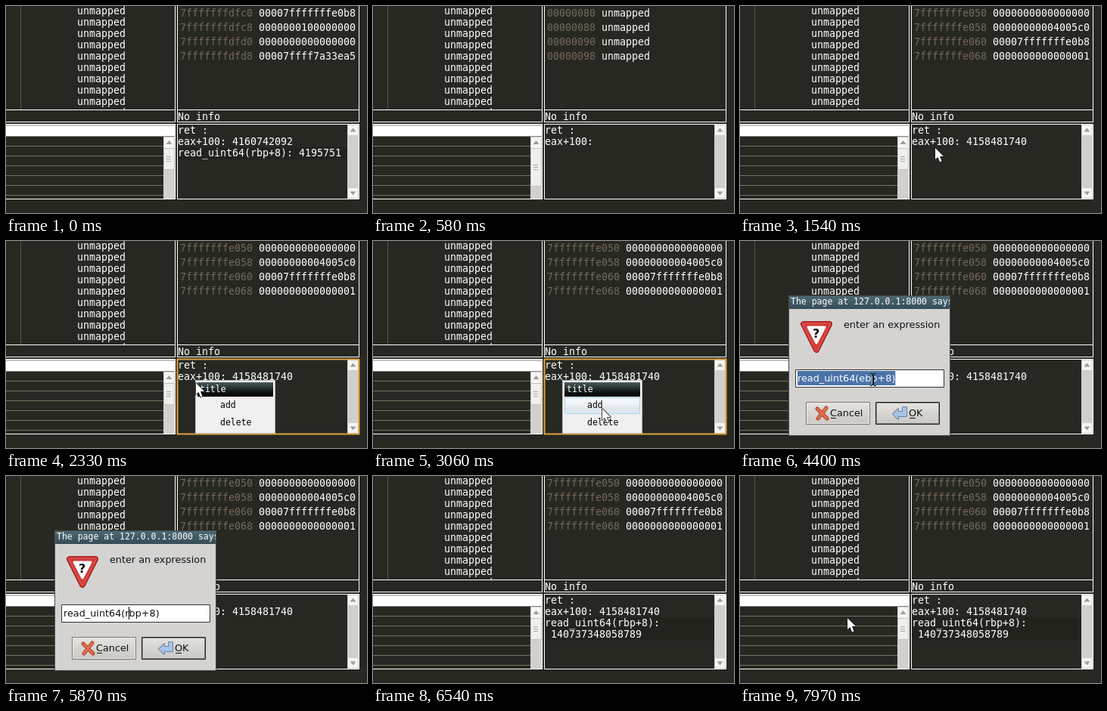
Write an HTML page with a canvas that moves like this. It is 477 px wide and 274 px high and loops after 8 s.

```html
<!DOCTYPE html>
<html lang="en">
<head>
<meta charset="utf-8">
<title>Debugger expressions</title>
<style>
  html, body { margin: 0; width: 100%; height: 100%; overflow: hidden; background: #272822; }
  canvas { display: block; }
</style>
</head>
<body>
<canvas id="stage" width="477" height="274"></canvas>
<script>
const ctx = document.getElementById('stage').getContext('2d');
const LOOP = 8000;
const BG = '#272822', WHITE = '#fff', DIM = '#75685a';
const MONO = '13.29px "DejaVu Sans Mono", monospace';
const SMALL = '11.5px "DejaVu Sans Mono", monospace';
const SANS = '12.8px "DejaVu Sans", sans-serif';

// Pointer stops: time, x, y. The pointer eases between neighbours.
const PATHS = [
  [[1320, 330, 234], [1540, 258, 188], [1800, 249, 185], [2290, 249, 185], [2500, 273, 211],
   [2760, 297, 232], [3060, 303, 222], [3140, 302, 217], [3660, 302, 217], [4000, 245, 200],
   [4400, 176, 183], [4480, 176, 183], [4720, 168, 181], [4870, 168, 181], [5200, 143, 191], [5660, 143, 191]],
  [[6900, 142, 188], [8000, 142, 188]]
];

function box(x, y, w, h, fill) {
  ctx.fillStyle = fill;
  ctx.fillRect(x, y, w, h);
}
function frame(x, y, w, h, color, width = 1) {
  ctx.strokeStyle = color;
  ctx.lineWidth = width;
  ctx.strokeRect(x + .5, y + .5, w - 1, h - 1);
}
function text(str, x, y, color = WHITE, font = MONO) {
  ctx.font = font;
  ctx.fillStyle = color;
  ctx.fillText(str, x, y);
}
function shape(points, fill, stroke, width = 1) {
  ctx.beginPath();
  points.forEach(([x, y]) => ctx.lineTo(x, y));
  ctx.closePath();
  ctx.lineJoin = 'round';
  ctx.lineWidth = width;
  if (stroke) { ctx.strokeStyle = stroke; ctx.stroke(); }
  if (fill) { ctx.fillStyle = fill; ctx.fill(); }
}
function shade(y, h, ...colors) {
  const g = ctx.createLinearGradient(0, y, 0, y + h);
  colors.forEach((c, i) => g.addColorStop(i / (colors.length - 1), c));
  return g;
}
function measure(str, font) {
  ctx.font = font;
  return ctx.measureText(str).width;
}

function pointerAt(t) {
  const path = PATHS.find(p => t >= p[0][0] && t < p[p.length - 1][0]);
  if (!path) return null;
  const i = path.findIndex(p => p[0] > t);
  const [t0, x0, y0] = path[i - 1], [t1, x1, y1] = path[i];
  const k = (t - t0) / (t1 - t0), e = k * k * (3 - 2 * k);
  return [Math.round(x0 + (x1 - x0) * e), Math.round(y0 + (y1 - y0) * e)];
}

function scrollButton(x, y, w, h, dir) {
  box(x, y, w, h, '#f6f5f4');
  frame(x, y, w, h, '#d0ccc9');
  const cx = x + w / 2, cy = y + h / 2;
  shape([[cx - 4, cy + 2 * dir], [cx + 4, cy + 2 * dir], [cx, cy - 3 * dir]], '#a09c98');
}

function drawCode() {
  ctx.save();
  ctx.beginPath();
  ctx.rect(0, 0, 223, 137);
  ctx.clip();
  box(19, 0, 1, 137, '#55554a');
  for (let i = 0; i < 10; i++) text('unmapped', 94, 11 + 15 * i);
  ctx.restore();
  box(0, 137, 224, 1, WHITE);
  box(0, 153, 224, 1, WHITE);
  box(223, 0, 1, 154, WHITE);
}

function drawTable(thumbEnd) {
  box(0, 156, 224, 1, WHITE);
  box(0, 157, 223, 2, '#c8c5c0');
  box(0, 159, 223, 13, WHITE);
  box(0, 172, 223, 1, '#8a8880');
  for (let y = 185; y < 255; y += 13) box(0, y, 208, 1, '#75715e');
  box(208, 173, 15, 82, '#d3cfcc');
  scrollButton(208, 173, 15, 16, 1);
  box(209, 189, 13, thumbEnd - 189, '#f0efed');
  frame(208, 188, 15, thumbEnd - 188, '#c4c0bc');
  const grip = Math.round((189 + thumbEnd) / 2);
  for (let i = -1; i < 2; i++) box(212, grip + 3 * i - 1, 6, 1, '#aaa6a2');
  box(223, 156, 1, 100, WHITE);
  box(0, 255, 224, 1, WHITE);
}

function drawStack(rows) {
  rows.forEach(([address, value], i) => {
    text(address, 230, 14 + 19 * i, DIM);
    text(value, 238 + 8 * address.length, 14 + 19 * i);
  });
  box(226, 0, 1, 154, WHITE);
  box(466, 0, 1, 154, WHITE);
  box(226, 137, 241, 1, WHITE);
  box(226, 153, 241, 1, WHITE);
  text('No info', 227, 151);
}

function drawExpressions(lines, focused) {
  if (lines.length > 2) box(227, 187, 224, 15 * (lines.length - 2) + 1, '#22231c');
  lines.forEach((line, i) => text(line, 227, 169 + 15 * i));
  box(451, 157, 15, 98, '#d3cfcc');
  scrollButton(451, 157, 15, 15, 1);
  scrollButton(451, 240, 15, 15, -1);
  frame(226, 156, 241, 100, focused ? '#e0a23c' : WHITE, focused ? 2 : 1);
}

function drawMenu(pointer) {
  box(250, 184, 106, 71, '#f0f0f0');
  frame(250, 184, 106, 71, '#b8b8b8');
  box(253, 187, 100, 19, shade(187, 19, '#4d5c5c', '#2c3939', '#101616', '#000'));
  text('title', 256, 200, WHITE, SMALL);
  ['add', 'delete'].forEach((item, i) => {
    const top = 207 + 23 * i;
    if (pointer && pointer[1] >= top && pointer[1] < top + 23) {
      box(253, top, 100, 22, shade(top, 22, '#f5f9fc', '#f0f5f9', '#e0e6ed', '#dfe6ee'));
      frame(253, top, 100, 22, '#a9d9ec');
    }
    text(item, 283, 221 + 23 * i, '#000', SMALL);
  });
}

function drawButton(x, label, labelX, strong) {
  box(x, 213, 85, 31, shade(213, 31, '#e6e5e3', '#d6d4d1', '#c9c7c4'));
  frame(x, 213, 85, 30, strong ? '#1c1c1c' : '#777572');
  frame(x + 1, 214, 83, 28, strong ? '#8a8886' : '#efeeec');
  text(label, labelX, 232, '#111', SANS);
  box(labelX + 1, 234, measure(label[0], SANS) - 2, 1, '#111');
}

function drawDialog(t) {
  box(64, 72, 214, 186, '#d5d3d1');
  frame(64, 72, 214, 186, '#4a4a48');
  box(65, 73, 212, 17, shade(73, 17, '#4d6874', '#354c58'));
  ctx.save();
  ctx.beginPath();
  ctx.rect(65, 72, 212, 18);
  ctx.clip();
  text('The page at 127.0.0.1:8000 says:', 67, 84, WHITE, SMALL);
  ctx.restore();

  const sign = [[84, 110], [118, 110], [101, 144]];
  shape(sign, '#cc2f2f', '#a31f22', 8);
  shape(sign, '#d23a3a', '#d94a46', 5);
  shape([[90, 114], [112, 114], [101, 135]], '#fbfbfb', '#fbfbfb', 3);
  text('?', 96, 128, '#111', 'bold 16px "DejaVu Sans", sans-serif');
  text('enter an expression', 137, 115, '#111', SANS);

  box(73, 170, 197, 24, WHITE);
  frame(73, 170, 197, 24, '#333');
  const head = 'read_uint64(', typed = t < 5660 ? 'e' : t < 5870 ? '' : 'r';
  const value = head + typed + 'bp+8)';
  const selected = t < 4870;
  if (selected) box(76, 172, measure(value, SANS), 19, '#4a73a8');
  text(value, 76, 186, selected ? WHITE : '#111', SANS);
  if (!selected) box(Math.round(76 + measure(head + typed, SANS)) - 1, 173, 1, 17, '#000');

  drawButton(87, 'Cancel', 119, false);
  const arms = [[102, 222, 115, 235], [114, 221, 103, 235]];
  ctx.lineCap = 'round';
  [['#a83a20', 5], ['#e2714f', 3]].forEach(([color, width]) => {
    ctx.strokeStyle = color;
    ctx.lineWidth = width;
    arms.forEach(([x0, y0, x1, y1]) => {
      ctx.beginPath();
      ctx.moveTo(x0, y0);
      ctx.lineTo(x1, y1);
      ctx.stroke();
    });
  });
  ctx.lineCap = 'butt';

  drawButton(179, 'OK', 223, true);
  shape([[202, 229], [209, 222], [209, 226], [215, 226], [215, 220], [220, 220],
         [220, 232], [209, 232], [209, 236]], '#a9c4e4', '#45699b', 1.5);
}

function drawArrow(x, y) {
  const outline = [[0, 0], [0, 15], [3.5, 12], [6, 18.5], [8.5, 17.5], [6, 11], [11, 11]];
  shape(outline.map(([dx, dy]) => [x + dx, y + dy]), WHITE, '#111', 1.5);
}

function drawIBeam(x, y) {
  [[-4, -8, 3, 1], [1, -8, 3, 1], [-1, -7, 2, 15], [-4, 8, 3, 1], [1, 8, 3, 1]]
    .forEach(([dx, dy, w, h]) => box(x + dx, y + dy, w, h, '#111'));
}

function stackAt(t) {
  if (t < 500) return [
    ['7fffffffdfc0', '00007fffffffe0b8'], ['7fffffffdfc8', '0000000100000000'],
    ['7fffffffdfd0', '0000000000000000'], ['7fffffffdfd8', '00007ffff7a33ea5']];
  if (t < 860) return ['80', '88', '90', '98'].map(a => ['000000' + a, 'unmapped']);
  return [
    ['7fffffffe050', '0000000000000000'], ['7fffffffe058', '00000000004005c0'],
    ['7fffffffe060', '00007fffffffe0b8'], ['7fffffffe068', '0000000000000001']];
}

function expressionsAt(t) {
  if (t < 500) return ['ret :', 'eax+100: 4160742092', 'read_uint64(rbp+8): 4195751'];
  const lines = ['ret :', t < 940 ? 'eax+100:' : 'eax+100: 4158481740'];
  if (t >= 6460) lines.push('read_uint64(rbp+8):');
  if (t >= 6540) lines.push(' 140737348058789');
  return lines;
}

function draw(t) {
  const pointer = pointerAt(t);
  const dialogOpen = t >= 3370 && t < 6400;
  box(0, 0, 477, 274, BG);
  drawCode();
  drawTable(t >= 500 && t < 860 ? 239 : 217);
  drawStack(stackAt(t));
  drawExpressions(expressionsAt(t), t >= 1900 && t < 3330);
  if (t >= 2000 && t < 3290) drawMenu(pointer);
  if (dialogOpen) drawDialog(t);
  if (pointer) {
    const [x, y] = pointer;
    const overField = dialogOpen && x > 73 && x < 270 && y > 170 && y < 194;
    (overField ? drawIBeam : drawArrow)(x, y);
  }
}

function tick() {
  draw(performance.now() % LOOP);
  requestAnimationFrame(tick);
}
tick();
</script>
</body>
</html>
```
